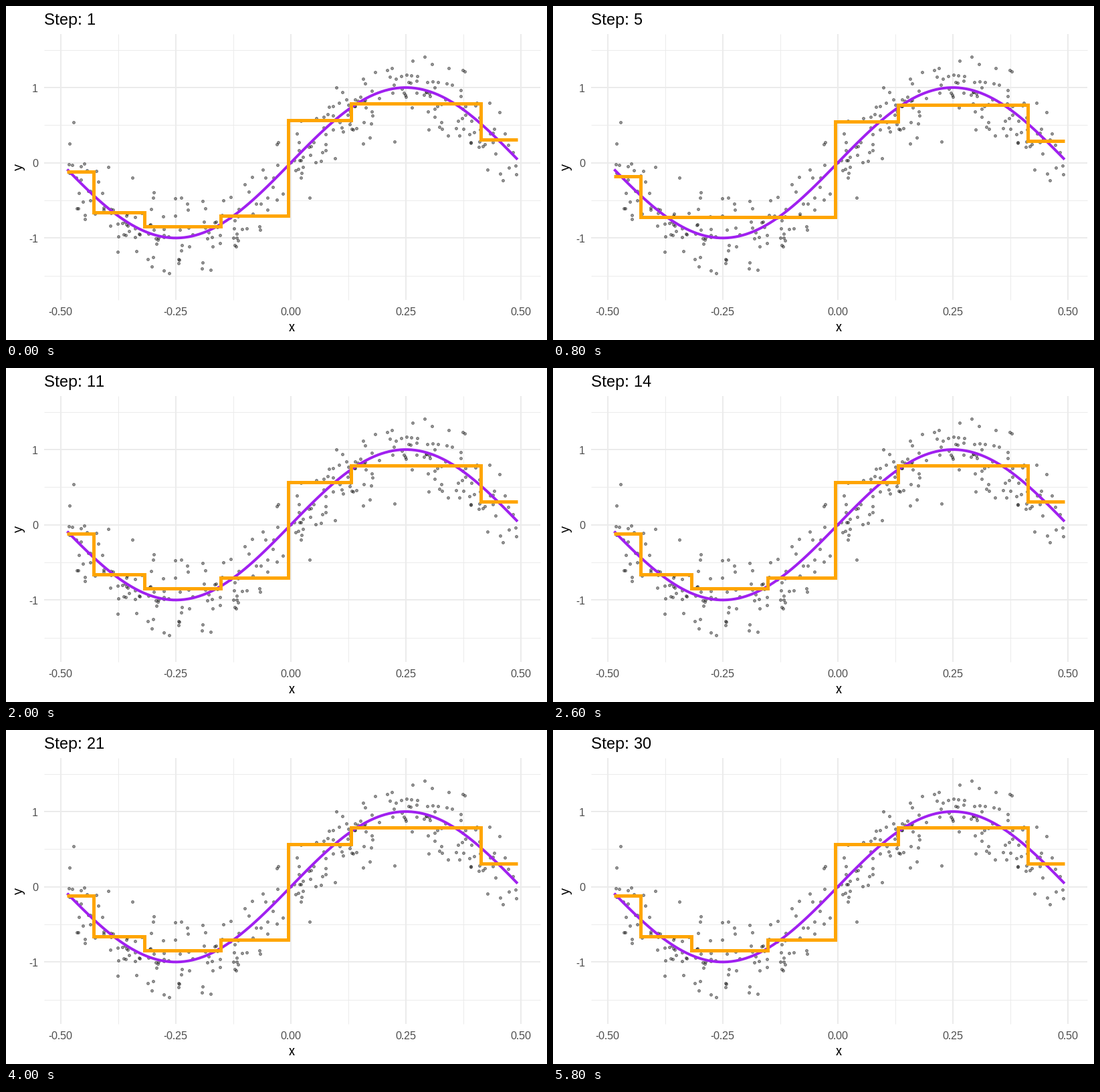
Write a matplotlib script that moves like this. It is 809x500 px and loops after 9000 ms.

```python
import numpy as np
import matplotlib.pyplot as plt
from matplotlib.animation import FuncAnimation

W, H, DPI = 809, 500, 64
PT = 72 / DPI                       # points per pixel
LEFT, RIGHT, TOP, BOTTOM = 57, 799, 42, 440
X_MIN, X_MAX = -0.486, 0.493
LAST_STEP, FRAMES = 30, 45

plt.rcParams.update({
    "font.family": "Liberation Sans",
    "text.hinting": "native",
    "text.hinting_factor": 1,
    "text.kerning_factor": 6,
})


def px(x):
    return 425.8 + 688 * x


def py(y):
    return 234.7 - 112.6 * y


def wave(x):
    return np.sin(2 * np.pi * x)


# Boosted stumps in pixels: split, shift left of it, shift right of it
STUMPS = [
    (422.5, 308.3, 165.7),
    (131.5, -57.3, 3.7),
    (516.5, 8.8, -16.7),
    (710.5, -5.2, 48.8),
    (321.5, 10.2, -5.6),
    (207.4, -16.6, 3.7),
]


def scatter(n=300, spread=0.28, limit=0.72):
    rng = np.random.default_rng(7)
    x = rng.uniform(X_MIN, X_MAX, n)
    noise = np.clip(rng.normal(0, spread, n), -limit, limit)
    return px(x), py(wave(x) + noise)


def fit_path(count):
    used = STUMPS[:count]
    edges = [px(X_MIN), *sorted(s for s, _, _ in used), px(X_MAX)]
    xs, ys = [], []
    for a, b in zip(edges, edges[1:]):
        mid = (a + b) / 2
        level = sum(lo if mid < s else hi for s, lo, hi in used)
        xs += [a, b]
        ys += [level, level]
    return xs, ys


def label(x, y, text, size, color="black", **kw):
    return ax.text(x, y, text, fontsize=size * PT, color=color,
                   va="baseline", **kw)


def grid(xs, ys, width):
    style = dict(color="#EBEBEB", lw=width * PT, zorder=1,
                 solid_capstyle="butt")
    for x in xs:
        ax.plot([px(x)] * 2, [TOP, BOTTOM], **style)
    for y in ys:
        ax.plot([LEFT, RIGHT], [py(y)] * 2, **style)


fig = plt.figure(figsize=(W / DPI, H / DPI), dpi=DPI, facecolor="white")
ax = fig.add_axes([0, 0, 1, 1])
ax.set_xlim(0, W)
ax.set_ylim(H, 0)
ax.axis("off")

x_ticks, y_ticks = np.linspace(-0.5, 0.5, 5), (-1, 0, 1)
grid(np.linspace(-0.375, 0.375, 4), np.linspace(-1.5, 1.5, 4), 1)
grid(x_ticks, y_ticks, 2)
for t in x_ticks:
    label(px(t), 463, f"{t:.2f}", 16, "#4D4D4D", ha="center")
for t in y_ticks:
    label(48, py(t) + 6.5, str(t), 16, "#4D4D4D", ha="right")
label(427.5, 487, "x", 20, ha="center")
label(25, 241, "y", 20, ha="center", rotation=90, rotation_mode="anchor")
title = label(57, 28, "", 24, ha="left")

ax.plot(*scatter(), "o", ms=4 * PT, mew=1 * PT, color="black", alpha=0.4,
        zorder=2)
curve_x = np.linspace(X_MIN, X_MAX, 120)
ax.plot(px(curve_x), py(wave(curve_x)), color="#A020F0", lw=4 * PT,
        solid_capstyle="butt", zorder=3)
fit, = ax.plot([], [], color="#FFA500", lw=5 * PT, solid_capstyle="butt",
               solid_joinstyle="miter", zorder=4)


def draw(i):
    step = min(i + 1, LAST_STEP)
    # The first step already shows the complete fit
    count = step - 1 if 2 <= step <= len(STUMPS) else len(STUMPS)
    fit.set_data(*fit_path(count))
    title.set_text(f"Step: {step}")
    return fit, title


anim = FuncAnimation(fig, draw, frames=FRAMES, interval=200, repeat=True,
                     repeat_delay=0, init_func=lambda: draw(0))
plt.show()
```
